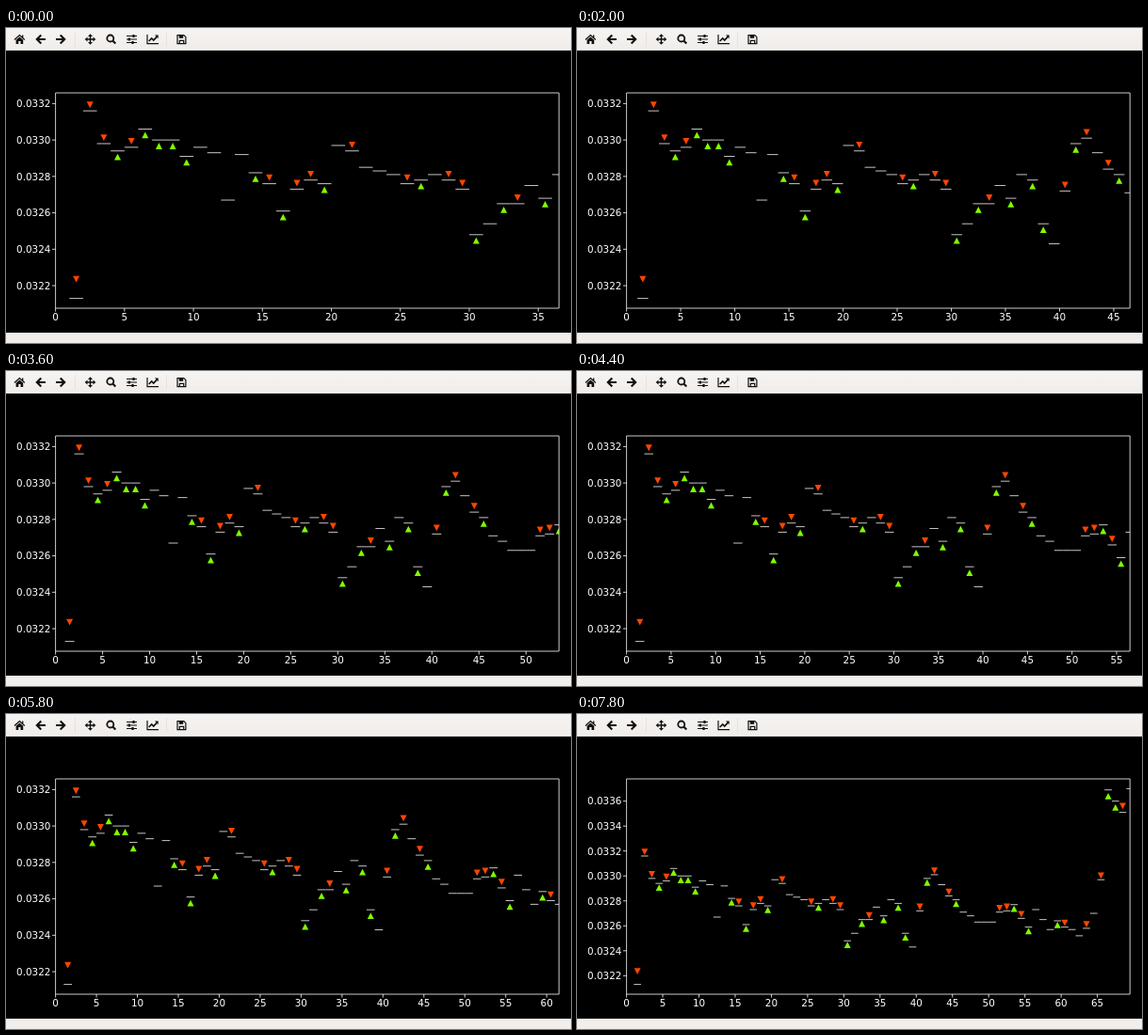
Write an HTML page that moves like this. It is 600 by 335 pixels and loops after 8 s.

```html
<!DOCTYPE html>
<html lang="en">
<head>
<meta charset="utf-8">
<title>Live price chart</title>
<style>
  html, body { margin: 0; width: 100%; height: 100%; overflow: hidden; background: #000; }
  svg { display: block; width: 600px; height: 335px; }
  text { font: 10.4px "DejaVu Sans", sans-serif; fill: #fff; }
  .axis { stroke: #fff; stroke-width: .8; fill: none; }
  .icon { stroke: #111; fill: none; stroke-width: 1.2; }
  .solid { fill: #111; stroke: none; }
</style>
</head>
<body>
<svg viewBox="0 0 600 335">
  <defs>
    <clipPath id="plot"><rect x="52.6" y="69" width="534.6" height="229"/></clipPath>
    <linearGradient id="bar" x2="0" y2="1">
      <stop stop-color="#f6f4f2"/><stop offset="1" stop-color="#f0ece9"/>
    </linearGradient>
    <path id="arrow" d="M5 0H-4M.3-4.4-4.2 0 .3 4.4" stroke-width="2.1"/>
  </defs>
  <rect width="600" height="335"/>
  <rect width="600" height="24" fill="url(#bar)"/>
  <rect y="23.3" width="600" height=".7" fill="#d8d4d0"/>
  <rect y="324" width="600" height="11" fill="#f2eeeb"/>
  <path d="M73.5 4V20M170.5 4V20" stroke="#e6e2de"/>
  <g class="icon">
    <path d="M9 12.4 14.4 7.6 19.8 12.4M17.7 7.5V10" stroke-width="1.3"/>
    <path class="solid" d="M10.6 12.8 14.4 9.5 18.2 12.8V17H15.5V14H13.3V17H10.6Z"/>
    <use href="#arrow" x="37" y="12"/>
    <use href="#arrow" transform="translate(58 12) scale(-1 1)"/>
    <path d="M85.5 12H93.5M89.5 8V16" stroke-width="1.5"/>
    <path class="solid" d="M89.5 6.2 92 9H87ZM89.5 17.8 92 15H87ZM83.7 12 86.5 9.5V14.5ZM95.3 12 92.5 9.5V14.5Z"/>
    <circle cx="110.8" cy="11" r="3.5" stroke-width="1.8"/>
    <path d="M113.5 13.7 116.3 16.5" stroke-width="2.2"/>
    <path d="M128 8.5H139M128 12H139M128 15.5H139"/>
    <path d="M135.5 7V10M130.8 10.5V13.5M134.5 14V17" stroke-width="2.2"/>
    <path d="M150 7V16.6H162"/>
    <path d="M151.7 14 154.7 11 156.7 13 160.3 9.2" stroke-width="1.7"/>
    <path class="solid" d="M158 7.6H161.7V11.3Z"/>
    <path d="M182 7.6H188.8L190.9 9.7V16.6H182Z"/>
    <path d="M184.3 16.5V13.3H188.7V16.5"/>
    <path class="solid" d="M183.8 7.6H188.2V10.8H183.8Z"/>
  </g>
  <g id="chart"></g>
</svg>
<script>
const LEFT = 52.6, RIGHT = 587.2, TOP = 69, BOTTOM = 298;
const LOOP = 8000, STEP = 200;

// Prices in units of 0.00001 above 0.032; candle n covers n to n + 1.
const prices = [
  13, 116, 98, 94, 96, 106, 100, 100, 91, 96, 93, 67, 92, 82, 76, 61, 73, 78, 76, 97,
  94, 85, 83, 81, 76, 78, 81, 78, 73, 48, 54, 65, 65, 75, 68, 81, 78, 54, 43, 72,
  98, 101, 93, 84, 81, 71, 68, 63, 63, 63, 71, 72, 77, 66, 59, 73, 65, 57, 64, 59,
  57, 52, 58, 70, 97, 169, 160, 151, 170];
// One letter per candle: v = sell, ^ = buy, . = no signal
const signals = 'vvv^v^^^^....^v^vv^.v...v^.vv^.^v.^.^^.v^v.v^.....vv^v^...^v..v.v^^v.';

// Newest candle at given steps; the feed slows down now and then.
const pace = [[0, 36], [6, 42], [14, 49], [22, 56], [29, 61], [35, 67], [39, 69]];

function newestCandle(step) {
  const i = pace.findIndex(([s]) => s >= step);
  if (i === 0) return pace[0][1];
  const [s0, n0] = pace[i - 1], [s1, n1] = pace[i];
  return Math.round(n0 + (n1 - n0) * (step - s0) / (s1 - s0));
}

function signalOffset(n) {
  return n === 1 ? 10.6 : n >= 66 ? 5 : 3.3;
}

function marker(x, y, dir) {
  const color = dir > 0 ? '#ff4500' : '#7fff00';
  return `<path fill="${color}" d="M${x - 3.5} ${y - 3.4 * dir}h7L${x} ${y + 3.4 * dir}Z"/>`;
}

function chart(last) {
  const shown = prices.slice(0, last);
  const low = 13, high = Math.max(120.5, ...shown);
  const margin = (high - low) * .05;
  const scaleY = (BOTTOM - TOP) / (high - low + 2 * margin);
  const X = v => LEFT + v * (RIGHT - LEFT) / (last + .5);
  const Y = v => TOP + (high + margin - v) * scaleY;

  let lines = '', markers = '', ticks = '', labels = '';
  shown.forEach((price, i) => {
    const n = i + 1, signal = signals[i];
    lines += `M${X(n)} ${Y(price)}H${X(n + 1)}`;
    if (signal !== '.') {
      const dir = signal === 'v' ? 1 : -1;
      markers += marker(X(n + .5), Y(price + dir * signalOffset(n)), dir);
    }
  });
  for (let v = 0; v <= last; v += 5) {
    ticks += `M${X(v)} ${BOTTOM}v3.6`;
    labels += `<text x="${X(v)}" y="311.4" text-anchor="middle">${v}</text>`;
  }
  for (let v = 20; v <= high + margin; v += 20) {
    ticks += `M${LEFT} ${Y(v)}h-3.6`;
    labels += `<text x="47.4" y="${Y(v) + 3.8}" text-anchor="end">${(.032 + v / 1e5).toFixed(4)}</text>`;
  }
  return `<g clip-path="url(#plot)"><path d="${lines}" stroke="#c4c4c4"/>${markers}</g>
    <path class="axis" d="M${LEFT} ${TOP}H${RIGHT}V${BOTTOM}H${LEFT}Z${ticks}"/>${labels}`;
}

const target = document.getElementById('chart');
let drawn = 0;
function frame() {
  const last = newestCandle(Math.floor(performance.now() % LOOP / STEP));
  if (last !== drawn) target.innerHTML = chart(drawn = last);
  requestAnimationFrame(frame);
}
frame();
</script>
</body>
</html>
```
